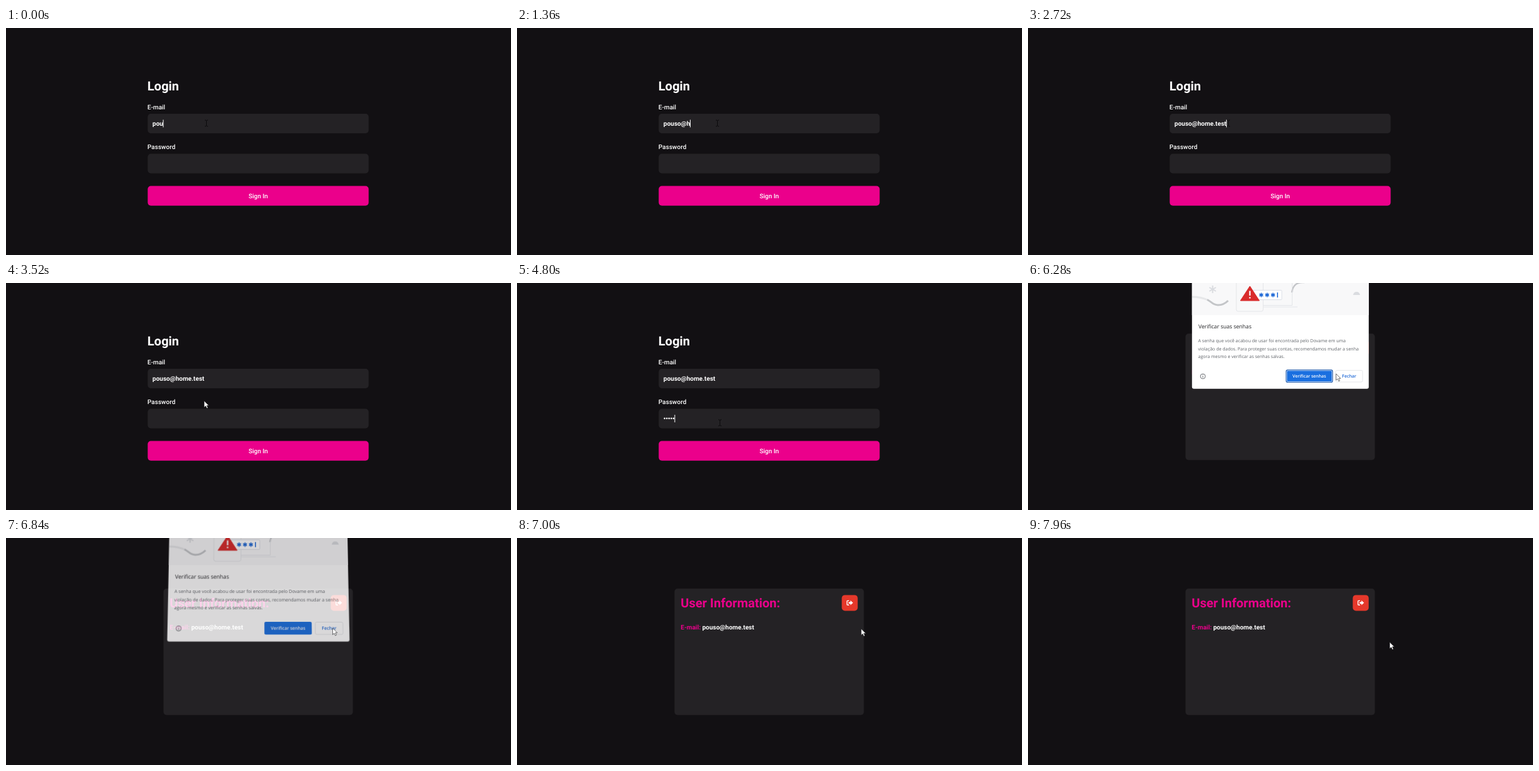
Animation, 800 px wide and 360 px high, one loop 8 s. Source, as an HTML page:

```html
<!DOCTYPE html>
<html lang="pt">
<head>
<meta charset="utf-8">
<title>Login</title>
<style>
  html, body { margin: 0; width: 100%; height: 100%; overflow: hidden; background: #121013; }
  #stage { position: absolute; inset: 0; overflow: hidden; contain: strict; }
  svg { position: absolute; left: 0; top: 0; width: 800px; height: 360px; }
  text { font: 700 10px Roboto, sans-serif; fill: #fff; text-rendering: geometricPrecision; }
  .big { font-size: 20px; }
  .label { font-weight: 500; }
  .pink { fill: #eb008b; }
  .box { fill: #242225; }
  #dialog { transform-origin: 399.8px 0; }
  #dialog text { font: 400 7.05px "Open Sans", "Noto Sans", sans-serif; fill: #5f6368; }
  #dialog .title { font-size: 8.6px; fill: #202124; }
  #dialog .btn { font-size: 6.9px; font-weight: 600; text-anchor: middle; }
  .line { fill: none; stroke: #dfe1e5; stroke-width: .8; }
</style>
</head>
<body>
<div id="stage">
<svg viewBox="0 0 800 360">
  <g id="login">
    <text class="big" x="224" y="98.5">Login</text>
    <text class="label" x="224" y="128.5">E-mail</text>
    <rect class="box" x="224.5" y="136" width="350" height="31" rx="5"/>
    <text id="email" x="232" y="155"></text>
    <text class="label" x="224" y="191.8">Password</text>
    <rect class="box" x="224.5" y="199.5" width="350" height="31" rx="5"/>
    <g id="dots" fill="#fff"></g>
    <rect id="caret" width="1" height="12" fill="#fff"/>
    <rect class="pink" x="224.5" y="250.5" width="350" height="31.2" rx="5"/>
    <text class="label" x="399.5" y="270" text-anchor="middle">Sign In</text>
  </g>
  <g id="user">
    <rect class="box" x="249.5" y="80.3" width="300" height="200.4" rx="5"/>
    <text class="big pink" x="259.3" y="110">User Information:</text>
    <text class="pink" x="259.3" y="145">E-mail: <tspan id="shown" fill="#fff"></tspan></text>
    <rect x="514.5" y="90.4" width="25.2" height="25" rx="5" fill="#e5382b"/>
    <path d="M526 99.4h-2.2q-1 0-1 1v4.8q0 1 1 1h2.2" fill="none" stroke="#fff" stroke-width="1.4"/>
    <path d="M525.3 101.4h2.9v-2.4l4.2 3.8-4.2 3.8v-2.4h-2.9z" fill="#fff"/>
  </g>
</svg>

<svg id="dialog" viewBox="0 0 800 360">
  <rect x="259.8" y="-20" width="280" height="187.8" rx="3" fill="#fff"/>
  <path d="M259.8 0h280V51h-280z" fill="#f8f8f9"/>
  <path d="M260 22q14 0 25 5" fill="none" stroke="#e6e7e9" stroke-width="3"/>
  <path d="M284 26.5c8 4 9 8.5 17 8.5q9 0 16-7" fill="none" stroke="#c3c5c8" stroke-width="3"/>
  <path d="M418 15C419 5 425-2 438-1" fill="none" stroke="#c3c5c8" stroke-width="2.5"/>
  <path d="M515 19q1-5 5.5-5t5.5 5z" fill="#dadce0"/>
  <path class="line" d="M373 35.5H418.5V0M373 38H427"/>
  <rect class="line" x="330" y="-10" width="42.5" height="55" rx="3"/>
  <rect x="352" y="11.5" width="50" height="15" rx="1" fill="#fff" stroke="#d3d8e2" stroke-width=".8"/>
  <path d="M351.5 5L366.5 28H336.5z" fill="#d92b2b" stroke="#d92b2b" stroke-linejoin="round"/>
  <path d="M351.5 12.5v7.5M351.5 22.3v2.2" stroke="#fff" stroke-width="2.2"/>
  <g id="stars" fill="none"></g>
  <path d="M395.3 15v8" stroke="#1a66d6" stroke-width="1.5"/>
  <text class="title" x="270" y="72">Verificar suas senhas</text>
  <text x="269.5" y="93.8">A senha que você acabou de usar foi encontrada pelo Dovame em uma</text>
  <text x="269.5" y="106.5">violação de dados. Para proteger suas contas, recomendamos mudar a senha</text>
  <text x="269.5" y="119.1">agora mesmo e verificar as senhas salvas.</text>
  <circle cx="277" cy="148" r="3.9" fill="none" stroke="#5f6368" stroke-width=".9"/>
  <path d="M277 147.3v2.7M277 145.5v.9" stroke="#5f6368"/>
  <rect x="409.1" y="138" width="72.9" height="19.2" rx="2" fill="#1a6fe0"/>
  <g id="ring" fill="none">
    <rect x="408.9" y="137.9" width="73.7" height="19.6" rx="2.5" stroke="#2d62ad" stroke-width="1.2"/>
    <rect x="409.9" y="138.9" width="71.7" height="17.6" rx="2" stroke="#fff" stroke-width=".7"/>
  </g>
  <text class="btn" x="445.6" y="150.3" style="fill:#fff">Verificar senhas</text>
  <rect class="line" x="487.5" y="138.5" width="42.5" height="18.5" rx="2"/>
  <text class="btn" x="508.8" y="150.3" style="fill:#1a66d6">Fechar</text>
</svg>

<svg viewBox="0 0 800 360">
  <path id="beam" d="M-2.5-5q2.5 0 2.5 1.5q0-1.5 2.5-1.5M0-4V4M-2.5 5q2.5 0 2.5-1.5q0 1.5 2.5 1.5" fill="none" stroke="#0b0a0c"/>
  <path id="arrow" d="M0 0V10.2L2.4 8L4.2 11.8L5.9 11L4.2 7.3H7.3z" fill="#fff" stroke="#1a1a1c" stroke-width=".6"/>
</svg>
</div>

<script>
const $ = id => document.getElementById(id);
const LOOP = 8000, EMAIL = "pouso@home.test";
const SIGNED_IN = 5160, OPEN = 5680, CLOSE = 6760, FOCUS = 3720, DOT = 3.55;
const emailKeys = [0, 0, 0, 40, 260, 920, 1200, 1400, 1640, 2160, 2280, 2400, 2520, 2600, 2720];
const passKeys = [4000, 4200, 4400, 4600, 4800];
// time, x, y of the pointer tip
const path = [
  [0, 311.5, 144], [3200, 311.5, 144], [3760, 315.5, 214.7], [5800, 315.5, 214.7],
  [6280, 488, 144], [6480, 516, 143], [6640, 517.5, 143], [6880, 517.5, 143],
  [7320, 667, 148], [7520, 669, 147.5], [7780, 669, 147.5], [7960, 573, 165.3], [LOOP, 573, 165.3]
];

const clamp = v => Math.max(0, Math.min(1, v));
const smooth = v => v * v * (3 - 2 * v);
const show = (el, on) => el.setAttribute("visibility", on ? "visible" : "hidden");
const place = (el, x, y) => el.setAttribute("transform", `translate(${x} ${y})`);

function star(x, y, r, color, width) {
  let d = "";
  for (let a = Math.PI / 2; a < 4; a += Math.PI / 3) {
    const dx = r * Math.cos(a), dy = r * Math.sin(a);
    d += `M${x - dx} ${y - dy}L${x + dx} ${y + dy}`;
  }
  return `<path d="${d}" stroke="${color}" stroke-width="${width}"/>`;
}
$("stars").innerHTML = star(292.5, 10, 6, "#dadce0", 2) +
  [369.5, 378.8, 388.1].map(x => star(x, 19, 3.5, "#1a66d6", 1.5)).join("");
$("dots").innerHTML = passKeys.map((_, i) =>
  `<circle cx="${233.8 + DOT * i}" cy="214.8" r="1.3"/>`).join("");
$("shown").textContent = EMAIL;

function pointer(t) {
  const i = path.findIndex(k => k[0] > t);
  const [t0, x0, y0] = path[i - 1], [t1, x1, y1] = path[i];
  const e = smooth((t - t0) / (t1 - t0));
  return [x0 + (x1 - x0) * e, y0 + (y1 - y0) * e];
}

function drawForm(t) {
  const typed = emailKeys.filter(k => k <= t), dots = passKeys.filter(k => k <= t);
  const inPass = t >= FOCUS;
  const last = inPass ? Math.max(FOCUS, ...dots) : Math.max(...typed);
  $("email").textContent = EMAIL.slice(0, typed.length);
  [...$("dots").children].forEach((dot, i) => dot.setAttribute("opacity", i < dots.length ? 1 : 0));
  const width = inPass ? dots.length * DOT : $("email").getComputedTextLength();
  $("caret").setAttribute("x", 231.7 + width);
  $("caret").setAttribute("y", inPass ? 209 : 145.5);
  $("caret").setAttribute("opacity", (t - last) % 1000 < 500 ? 1 : 0);
}

function drawDialog(t) {
  let tilt, alpha;
  if (t < CLOSE) {
    tilt = (1 - clamp((t - OPEN) / 240)) ** 2;
    alpha = t < OPEN ? 0 : .22 + .78 * clamp((t - OPEN) / 160);
  } else {
    const q = clamp((t - CLOSE) / 240);
    tilt = Math.min(1, q * 3);
    alpha = 1 - q ** 1.6;
  }
  const s = $("dialog").style;
  s.display = alpha ? "" : "none";
  s.opacity = alpha;
  // leans back: the lower edge comes closer to the viewer
  s.transform = tilt ? `matrix3d(1,0,0,0, 0,1,0,${(-.000147 * tilt).toFixed(8)}, 0,0,1,0, 0,${-8.6 * tilt},0,${1 - .0063 * tilt})` : "none";
  $("ring").setAttribute("opacity", t < CLOSE - 40 ? 1 : 0);
}

function frame() {
  const t = performance.now() % LOOP;
  const form = t < SIGNED_IN;
  $("login").style.display = form ? "" : "none";
  $("user").style.display = form ? "none" : "";
  if (form) drawForm(t);
  drawDialog(t);

  const [x, y] = pointer(t);
  const overField = form && (y + 7 < 167 || y + 7 > 199.5);
  show($("beam"), overField);
  show($("arrow"), !overField);
  place($("beam"), x + 6, y + 7);
  place($("arrow"), x, y);
  requestAnimationFrame(frame);
}
frame();
</script>
</body>
</html>
```
